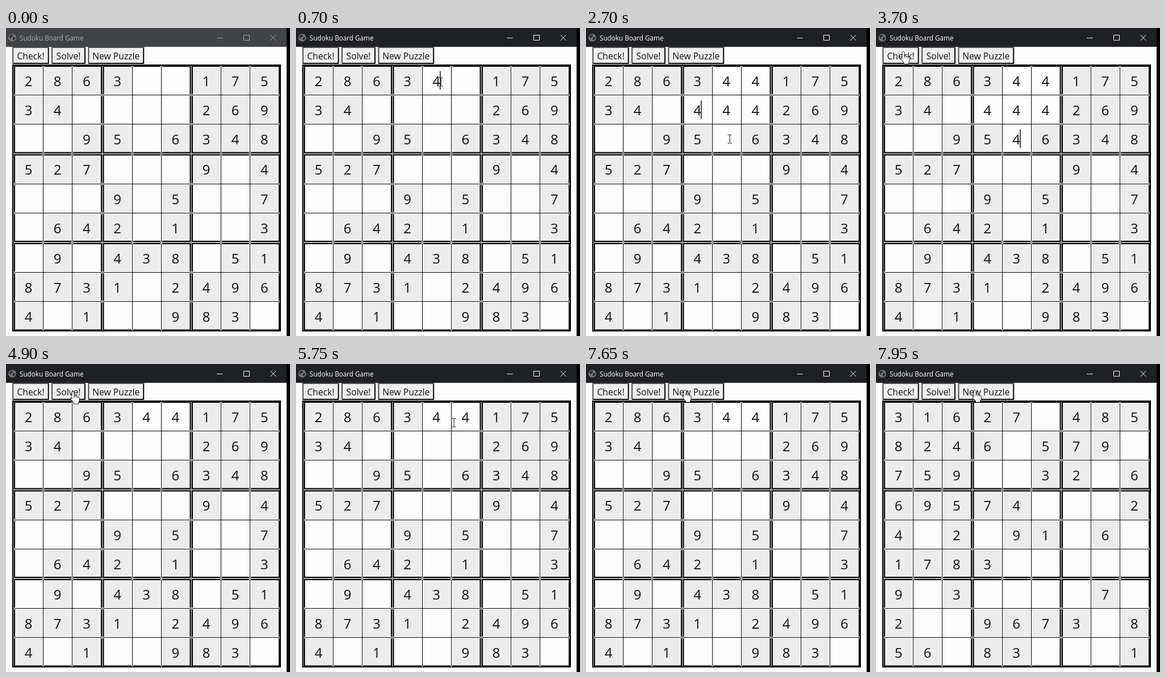
Animation, 500 px wide and 540 px high, one loop 8 s. Source, as an HTML page:

```html
<!DOCTYPE html>
<html lang="en">
<head>
<meta charset="utf-8">
<title>Sudoku Board Game</title>
<style>
  html, body { margin: 0; width: 100%; height: 100%; overflow: hidden; background: #000; }
  svg { display: block; width: 500px; height: 540px; font-family: "Open Sans", "Noto Sans", sans-serif; }
  .digit { font-size: 24px; text-anchor: middle; fill: #111; }
  .label { font-size: 15.7px; text-anchor: middle; fill: #111; }
</style>
</head>
<body>
<svg id="stage" viewBox="0 0 500 540"></svg>
<script>
const LOOP = 8000, FOCUS = 50, CHECK = 4000, RENEW = 7750;
const FIRST_CLICK = 620, CLICK_GAP = 475, TYPE_DELAY = 80;

const puzzles = [
  "2863..175 34....269 ..95.6348 527...9.4 ...9.5..7 .642.1..3 .9.438.51 8731.2496 4.1..983.",
  "31627.485 8246.579. 759..32.6 69574...2 4.2.91.6. 1783..... 9.3....7. 2..9673.8 56.83...1"
].map(s => s.split(" "));

// Board geometry: cells repeat inside a group, groups repeat across the board.
const PITCH = 51.2;
const across = { start: 15, size: 153, group: 156.5, line: 65, mid: 39.5 };
const down = { start: 67, size: 151.5, group: 155.5, line: 117, mid: 93.4 };
const mid = (axis, i) => axis.mid + axis.group * (i / 3 | 0) + PITCH * (i % 3);
const line = (axis, g, k) => Math.round(axis.line + axis.group * g + PITCH * k);

// The empty cells of the top middle box are filled in a zigzag.
const visits = [];
for (let r = 0; r < 3; r++) {
  for (const c of r % 2 ? [5, 4, 3] : [3, 4, 5]) {
    if (puzzles[0][r][c] !== ".") continue;
    const click = FIRST_CLICK + CLICK_GAP * visits.length;
    visits.push({ r, c, click, type: click + TYPE_DELAY });
  }
}

// Pointer moves: leave, arrive, x, y
const legs = [
  ...visits.map(({ r, c }, i) => {
    const leave = i ? visits[i - 1].type : 150;
    return [leave, leave + (i ? 115 : 450), mid(across, c) + 8, mid(down, r) + 1];
  }),
  [3150, 3650, 48, 41], [3800, 3850, 37, 45],
  [4450, 4750, 118, 48], [4950, 5250, 299, 125],
  [5300, 5500, 250, 98], [5500, 5750, 278, 103], [5900, 6050, 268, 102],
  [6250, 6850, 136, 50], [7100, 7450, 174, 45]
];

function pointerAt(t) {
  let x = 236, y = 552;
  for (const [leave, arrive, toX, toY] of legs) {
    const u = Math.min(1, Math.max(0, (t - leave) / (arrive - leave)));
    const e = u * u * (3 - 2 * u);
    x += (toX - x) * e;
    y += (toY - y) * e;
  }
  return [x, y];
}

const stage = document.getElementById("stage");

function add(tag, attrs, text, parent = stage) {
  const el = document.createElementNS("http://www.w3.org/2000/svg", tag);
  for (const k in attrs) el.setAttribute(k, attrs[k]);
  if (text) el.textContent = text;
  parent.appendChild(el);
  return el;
}
const box = (x, y, width, height, fill) => add("rect", { x, y, width, height, fill });
const show = (el, on) => el.setAttribute("visibility", on ? "visible" : "hidden");

box(0, 0, 494, 540, "#fcfcfc");

function makeButton(x, w, name) {
  box(x, 33, w, 30, "#efefef");
  const low = add("path", { d: `M${x + w} 33v30h${-w}l2-2h${w - 4}v-26z` });
  const high = add("path", { d: `M${x} 63v-30h${w}l-2 2h${4 - w}v26z` });
  add("text", { x: x + w / 2, y: 55, class: "label" }, name);
  return pressed => {
    low.setAttribute("fill", pressed ? "#4c4c4c" : "#050505");
    high.setAttribute("fill", pressed ? "#050505" : "#4c4c4c");
  };
}
const pressCheck = makeButton(11.3, 64.4, "Check!");
makeButton(80, 60, "Solve!")(false);
const pressNew = makeButton(144.4, 98.8, "New Puzzle");

// Title bar
const bar = box(0, 0, 494, 33);
add("circle", { cx: 11, cy: 17, r: 6.8, fill: "#777a7d" });
add("path", { d: "M7 12.5l4-1 2 2-3 2.5-2 3-2.5-3zM13 16l3.5-.5-1 4-2.5 2.5-2-3z", fill: "#303236" });
const title = add("text", { x: 24, y: 21.5, "font-size": 11.7 }, "Sudoku Board Game");
const controls = add("path", {
  d: "M371.5 17.5h10M418.5 12.5h10v9h-10zM465.5 12l10 10M475.5 12l-10 10",
  fill: "none"
});

// Board
box(11, 64, 473, 468, "#000");
box(13, 66, 469, 464, "#b4b4b4");
const cells = [];
for (let i = 0; i < 9; i++) {
  const gx = i % 3, gy = i / 3 | 0;
  const x = across.start + across.group * gx, y = down.start + down.group * gy;
  const w = across.size, h = down.size;
  const xs = [x, line(across, gx, 0), line(across, gx, 1), x + w];
  const ys = [y, line(down, gy, 0), line(down, gy, 1), y + h];
  for (let k = 0; k < 9; k++) {
    const c = k % 3, r = k / 3 | 0;
    const fill = box(xs[c], ys[r], xs[c + 1] - xs[c], ys[r + 1] - ys[r]);
    cells.push({ r: gy * 3 + r, c: gx * 3 + c, fill });
  }
  add("rect", { x, y, width: w, height: h, fill: "none", stroke: "#000", "stroke-width": 2 });
  for (const [pad, color] of [[1, "#fff"], [0, "#000"]]) {
    for (const k of [1, 2]) {
      box(xs[k] - pad, y - 1, 1 + 2 * pad, h + 2, color);
      box(x - 1, ys[k] - pad, w + 2, 1 + 2 * pad, color);
    }
  }
}
for (const cell of cells)
  cell.text = add("text", { x: mid(across, cell.c), y: mid(down, cell.r) + 8.5, class: "digit" });

const caret = box(0, 0, 1.5, 32, "#111");
const pointer = add("g", {});
const beam = add("path", {
  d: "M-3.5-7.5h2.5l1 1 1-1h2.5M0-6.5v13M-3.5 7.5h2.5l1-1 1 1h2.5",
  fill: "none", stroke: "#111"
}, "", pointer);
const hand = add("g", { transform: "translate(-5 0)", stroke: "#111", "stroke-width": .9 }, "", pointer);
add("path", {
  d: "M5 .5c1.2 0 2 .8 2 2v6c.5-1 3-.9 3.3.5c.8-.8 2.8-.5 3 .8c1-.5 2.8 0 2.8 1.6v4.6" +
     "c0 1.5-1.6 3-1.6 4.5v1.5h-8v-1.5c0-1.5-5.5-6-5.9-8c-.3-1.6.8-2 1.6-1.2l.8 1.4V2.5c0-1.2.8-2 2-2z",
  fill: "#fff"
}, "", hand);
add("path", { d: "M7 8.5v3M10.3 9v2.5M13.3 9.8v2" }, "", hand);

function drawBoard(t) {
  const fresh = t >= RENEW, rows = puzzles[fresh ? 1 : 0];
  const filled = fresh ? [] : visits.filter(v => v.type <= t && (t < CHECK || v.r === 0));
  for (const { r, c, fill, text } of cells) {
    const given = rows[r][c] !== ".";
    fill.setAttribute("fill", given ? "#ececec" : "#fdfdfd");
    text.textContent = given ? rows[r][c] : filled.some(v => v.r === r && v.c === c) ? "4" : "";
  }
}

function draw(t) {
  const active = t >= FOCUS;
  bar.setAttribute("fill", active ? "#1f2024" : "#414347");
  title.setAttribute("fill", active ? "#fff" : "#aaabad");
  controls.setAttribute("stroke", active ? "#fff" : "#a0a1a3");
  pressCheck(t >= CHECK && t < CHECK + 100);
  pressNew(t >= RENEW - 50 && t < RENEW + 100);
  drawBoard(t);

  const spot = t < CHECK && visits.filter(v => v.click <= t).pop();
  show(caret, spot);
  if (spot) {
    caret.setAttribute("x", mid(across, spot.c) + (t >= spot.type ? 6 : 0));
    caret.setAttribute("y", mid(down, spot.r) - 17.5);
  }

  const [x, y] = pointerAt(t);
  pointer.setAttribute("transform", `translate(${x} ${y})`);
  show(hand, y < 63);
  show(beam, y >= 63);
}

const start = performance.now();
function tick() {
  draw((performance.now() - start) % LOOP);
  requestAnimationFrame(tick);
}
draw(0);
requestAnimationFrame(tick);
</script>
</body>
</html>
```
